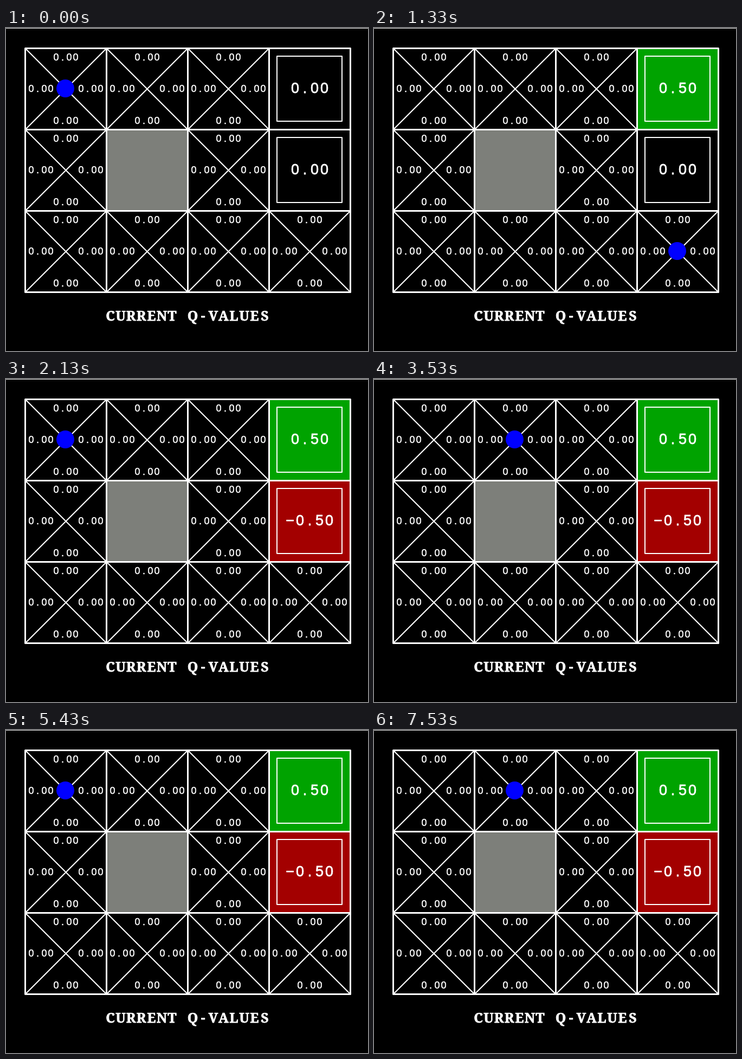
Write an HTML page with a canvas that moves like this. It is 668 by 596 pixels and loops after 8000 ms.

```html
<!DOCTYPE html>
<html lang="en">
<head>
<meta charset="utf-8">
<title>Current Q-values</title>
<style>
  html, body { margin: 0; width: 100%; height: 100%; overflow: hidden; background: #000; }
  canvas { display: block; }
</style>
</head>
<body>
<canvas id="stage" width="668" height="596"></canvas>
<script>
const ctx = document.getElementById('stage').getContext('2d');
const LOOP = 8000, CELL = 150, HALF = CELL / 2, LEFT = 35.5, TOP = 37.5;
const SANS = '"Liberation Sans", Arial, sans-serif';
const SERIF = 'bold 25px "Noto Serif", serif';
const STEP = { N: [0, -1], S: [0, 1], E: [1, 0], W: [-1, 0] };

// Each walk starts on a cell and takes steps at the given times
const walks = [
  { from: 0, to: 1330, col: 0, row: 0, path: 'EE', times: [800, 1070] },
  { from: 1330, to: 1530, col: 3, row: 2, path: 'N', times: [1500] },
  { from: 1630, to: LOOP, col: 0, row: 2, path: 'NNEWSNSNEWE',
    times: [1800, 2130, 3530, 4070, 4800, 4930, 5100, 5430, 6700, 7070, 7530] }
];

// A walk that ends on an exit gives that exit its value
const exits = [
  { color: '#00a300', value: '0.50', since: walks[0].to },
  { color: '#a30000', value: '−0.50', since: walks[1].to }
];

function agentAt(time) {
  const walk = walks.find(({ from, to }) => time >= from && time < to);
  if (!walk) return null;
  let { col, row } = walk;
  walk.times.forEach((start, i) => {
    if (time < start) return;
    const [dx, dy] = STEP[walk.path[i]];
    col += dx;
    row += dy;
  });
  return { col, row };
}

// Characters sit on a fixed pitch, centred on (x, y)
function monoText(text, x, y, size, pitch, font = `${size}px ${SANS}`) {
  ctx.font = font;
  ctx.lineWidth = size * 0.03;
  [...text].forEach((char, i) => {
    const spot = [x + (i - (text.length - 1) / 2) * pitch, y + size * 0.345];
    ctx.fillText(char, ...spot);
    ctx.strokeText(char, ...spot);
  });
}

function drawCross(x, y) {
  ctx.lineWidth = 2.2;
  ctx.beginPath();
  ctx.moveTo(x, y);
  ctx.lineTo(x + CELL, y + CELL);
  ctx.moveTo(x + CELL, y);
  ctx.lineTo(x, y + CELL);
  ctx.stroke();
}

function eachCell(draw) {
  for (let row = 0; row < 3; row++)
    for (let col = 0; col < 4; col++) {
      const exit = col === 3 ? exits[row] : undefined;
      draw(LEFT + col * CELL, TOP + row * CELL, exit, col === 1 && row === 1);
    }
}

function draw(time) {
  ctx.fillStyle = '#000';
  ctx.fillRect(0, 0, 668, 596);
  ctx.fillStyle = '#e8e8e8';
  ctx.fillRect(0, 0, 668, 1);
  ctx.strokeStyle = '#fff';
  ctx.textAlign = 'center';
  ctx.lineJoin = 'round';

  eachCell((x, y, exit, wall) => {
    if (!exit && !wall) return drawCross(x, y);
    ctx.fillStyle = wall ? '#7d7f7a' : time < exit.since ? '#000' : exit.color;
    ctx.fillRect(x, y, CELL, CELL);
    if (exit) {
      ctx.lineWidth = 2;
      ctx.strokeRect(x + 14.5, y + 14.5, 120, 120);
    }
  });
  ctx.lineWidth = 3;
  eachCell((x, y) => ctx.strokeRect(x, y, CELL, CELL));

  const agent = agentAt(time);
  if (agent) {
    ctx.fillStyle = '#00f';
    ctx.beginPath();
    ctx.arc(109.5 + agent.col * CELL, 111.5 + agent.row * CELL, 16.5, 0, 2 * Math.PI);
    ctx.fill();
  }

  ctx.fillStyle = '#fff';
  eachCell((x, y, exit, wall) => {
    if (wall) return;
    const cx = x + HALF, cy = y + HALF - 0.5;
    if (exit) return monoText(time < exit.since ? '0.00' : exit.value, cx, cy - 1, 27, 18);
    for (const [dx, dy] of Object.values(STEP))
      monoText('0.00', cx + dx * 46, cy + dy * 58.5, 18, 12);
  });
  monoText('CURRENT Q-VALUES', 335, 531, 25, 19, SERIF);
}

function tick() {
  draw(performance.now() % LOOP);
  requestAnimationFrame(tick);
}
tick();
</script>
</body>
</html>
```
